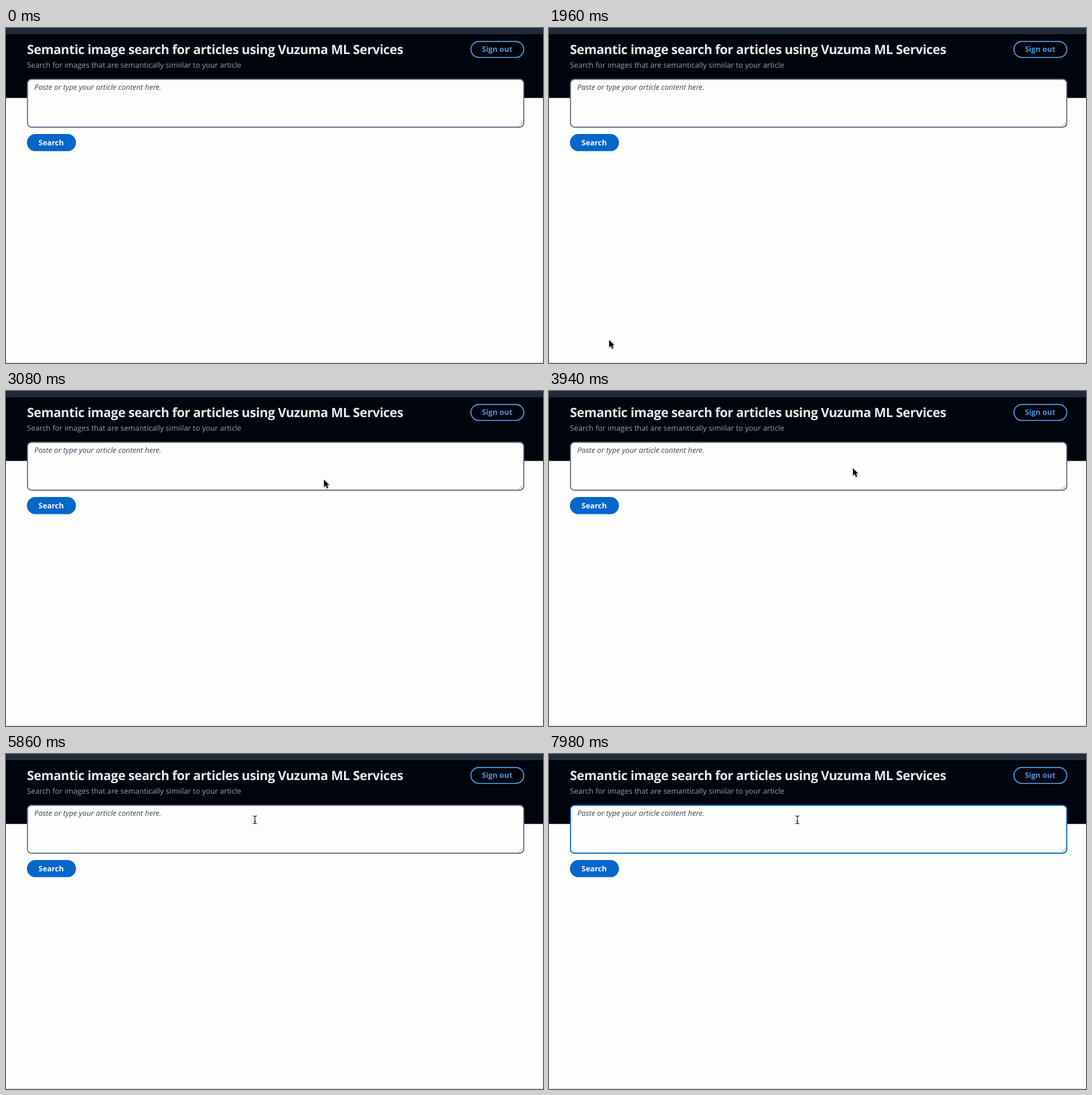
These frames come from a looping animation (947 by 591 pixels, 8000 ms). An HTML page:

```html
<!DOCTYPE html>
<html lang="en">
<head>
<meta charset="utf-8">
<title>Semantic image search</title>
<style>
  html, body { margin: 0; width: 100%; height: 100%; overflow: hidden; background: #fdfdfc; }
  svg { display: block; width: 947px; height: 591px; }
  text { font: 13.2px "Open Sans", "Noto Sans", sans-serif; text-rendering: geometricPrecision; white-space: pre; }
  .title { font-size: 22.62px; font-weight: 700; letter-spacing: -.02em; fill: #e6ebf0; }
  .subtitle { fill: #98a2ae; }
  .placeholder { font-style: italic; fill: #3c4856; }
  .label { font-weight: 700; letter-spacing: .005em; }

  .pointer, .arrow, .beam, .field, .caret { animation: 8s linear infinite; }
  .pointer { animation-name: travel; }
  .arrow, .beam, .field, .caret { animation-timing-function: step-end; }
  .arrow { animation-name: arrow; filter: drop-shadow(.5px 1px 1px #0006); }
  .beam { animation-name: beam; }
  .field { animation-name: focus; }
  .caret { animation-name: blink; }

  @keyframes travel {
    0%, 23.75% { transform: translate(99px, 556px); animation-timing-function: ease-in-out; }
    32.5%, 34% { transform: translate(574px, 167px); animation-timing-function: ease-in-out; }
    45%, 52.5% { transform: translate(536px, 136px); animation-timing-function: ease-in-out; }
    61%, 74% { transform: translate(439px, 116px); }
    76%, 100% { transform: translate(438px, 116px); }
  }
  @keyframes arrow {
    0% { opacity: 0; }
    23.75% { opacity: 1; }
    57%, 100% { opacity: 0; }
  }
  @keyframes beam {
    0% { opacity: 0; }
    57%, 100% { opacity: 1; }
  }
  @keyframes focus {
    0% { stroke: #656f84; }
    80%, 100% { stroke: #0968bd; }
  }
  @keyframes blink {
    0% { opacity: 0; }
    80% { opacity: 1; }
    86.25% { opacity: 0; }
    92.5% { opacity: 1; }
    98.75%, 100% { opacity: 0; }
  }
</style>
</head>
<body>
<svg viewBox="0 0 947 591">
  <rect width="947" height="123.4" fill="#00040c"/>
  <rect width="947" height="11" fill="#202b39"/>
  <rect y="590" width="947" height="1" fill="#d0cfe2"/>

  <text class="title" x="37" y="46">Semantic image search for articles using Vuzuma ML Services</text>
  <text class="subtitle" x="37" y="69.5">Search for images that are semantically simiilar to your article</text>

  <rect x="819.9" y="23.7" width="93.3" height="28.2" rx="14.1" fill="none" stroke="#4c98e0" stroke-width="1.9"/>
  <text class="label" x="839.2" y="42.3" fill="#4c98e0">Sign out</text>

  <rect class="field" x="37.9" y="90.5" width="875.2" height="84.5" rx="7" fill="#fdfdfc" stroke="#656f84" stroke-width="1.9"/>
  <text class="placeholder" x="50" y="109">Paste or type your article content here.</text>
  <path d="M904.5 173.5l7-7M908.5 173.5l3-3" stroke="#777" stroke-width=".9"/>
  <rect class="caret" x="50" y="97" width="1" height="16"/>

  <rect x="36.9" y="187.1" width="86.5" height="30.2" rx="15.1" fill="#0566cb"/>
  <text class="label" x="57.3" y="207" fill="#fff">Search</text>

  <g class="pointer">
    <path class="arrow" d="M0 0V13L3 10.2L5.3 15.4L7.4 14.5L5.2 9.4H9.2Z" stroke="#fff" stroke-width="1" paint-order="stroke"/>
    <path class="beam" d="M-3.5 -7Q-.5 -7 0 -5Q.5 -7 3.5 -7M0 -5V5M-3.5 7Q-.5 7 0 5Q.5 7 3.5 7M-1.8 2.5H1.8" fill="none" stroke="#111" stroke-width="1.2"/>
  </g>
</svg>
</body>
</html>
```
